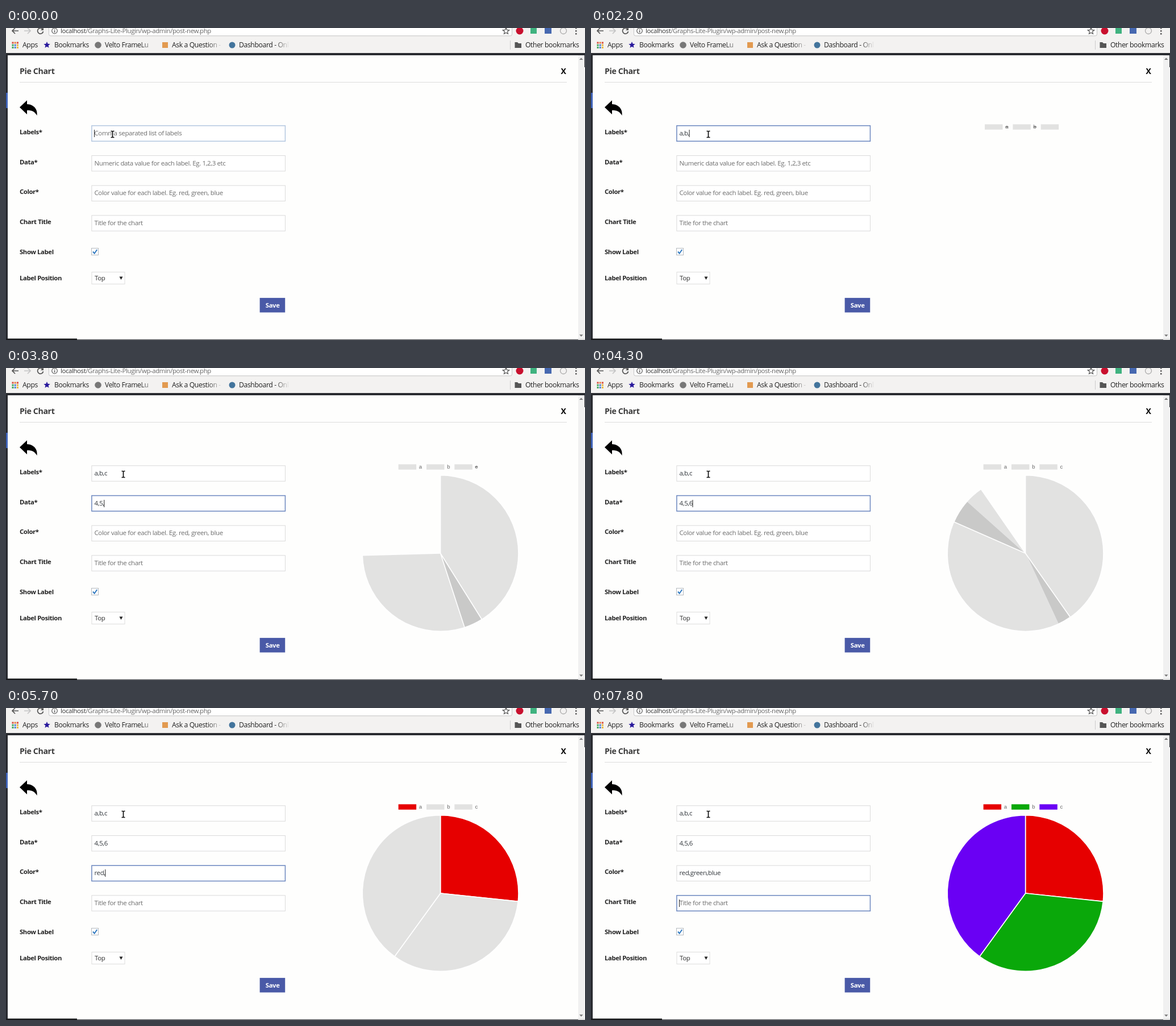
An HTML page with a canvas that plays this animation: 1019x549 px, repeating every 8 s.

```html
<!DOCTYPE html>
<html lang="en">
<head>
<meta charset="utf-8">
<title>Pie Chart form</title>
<style>
html, body { margin: 0; height: 100%; overflow: hidden; background: #fefefd; }
canvas { display: block; }
</style>
</head>
<body>
<canvas width="1019" height="549"></canvas>
<script>
const ctx = document.querySelector('canvas').getContext('2d');
const LOOP = 8000, STEP = 100;
const UI = '"Open Sans", "Noto Sans", sans-serif';
const PAGE = '#fefefd', BAR = '#f3f2f1', GREY = 'rgba(0,0,0,.11)', MUTED = '#636363';
const RED = '#e60000', GREEN = '#0aa80a', BLUE = '#6a00f4';

const fields = [
  ['Labels*', 'Comma separated list of labels'],
  ['Data*', 'Numeric data value for each label. Eg. 1,2,3 etc'],
  ['Color*', 'Color value for each label. Eg. red, green, blue'],
  ['Chart Title', 'Title for the chart'],
];
// time, field, typed text; an empty text means the field takes focus
const keys = [
  [99, 0, ''], [800, 0, 'a'], [1500, 0, 'a,'], [1800, 0, 'a,b'], [2200, 0, 'a,b,'], [2300, 0, 'a,b,c'],
  [2750, 1, ''], [3200, 1, '4'], [3500, 1, '4,'], [3700, 1, '4,5'], [3800, 1, '4,5,'], [4200, 1, '4,5,6'],
  [4550, 2, ''], [5100, 2, 'r'], [5200, 2, 're'], [5300, 2, 'red'], [5500, 2, 'red,'], [5800, 2, 'red,g'],
  [5900, 2, 'red,gr'], [6000, 2, 'red,gre'], [6200, 2, 'red,gree'], [6300, 2, 'red,green'],
  [6500, 2, 'red,green,'], [6900, 2, 'red,green,b'], [7100, 2, 'red,green,bl'],
  [7300, 2, 'red,green,blu'], [7400, 2, 'red,green,blue'], [7700, 3, ''],
];
const legends = [[0, null], [900, 'a'], [1700, 'a,'], [1900, 'a,b'], [2200, 'a,b,'], [2400, 'a,b,c']];
const strikeEnds = [3000, 3782, 4240];
const updates = [[3450, [4]], [3659, [4, 0]], [3782, [4, 5]], [3833, [4, 5, 0]], [4240, [4, 5, 6]], [4820, [4, 5, 6]]];
// time, legend colour, slice colour; half-typed names keep the previous fill
const paints = [
  [[0, GREY, GREY], [4820, MUTED, MUTED], [5300, RED, RED]],
  [[0, GREY, GREY], [5800, MUTED, RED], [6300, GREEN, GREEN]],
  [[0, GREY, GREY], [6900, MUTED, GREEN], [7400, BLUE, BLUE]],
];

const latest = (list, t) => list.filter(e => e[0] <= t).pop() || list[0];

function rect(x, y, w, h, fill) {
  ctx.fillStyle = fill;
  ctx.fillRect(x, y, w, h);
}

function frame(x, y, w, h, color, width = 1) {
  ctx.strokeStyle = color;
  ctx.lineWidth = width;
  ctx.strokeRect(x, y, w, h);
}

function text(s, x, y, color, size = 11.5, weight = 400) {
  ctx.font = `${weight} ${size}px ${UI}`;
  ctx.letterSpacing = '-0.38px';
  ctx.fillStyle = color;
  ctx.fillText(s, x, y);
  return ctx.measureText(s).width;
}

function path(d, fill, stroke, width = 1.5) {
  const p = new Path2D(d);
  if (fill) { ctx.fillStyle = fill; ctx.fill(p); }
  if (stroke) { ctx.strokeStyle = stroke; ctx.lineWidth = width; ctx.stroke(p); }
}

function dot(x, y, r, fill, stroke) {
  ctx.beginPath();
  ctx.arc(x, y, r, 0, 7);
  if (fill) { ctx.fillStyle = fill; ctx.fill(); }
  if (stroke) { ctx.strokeStyle = stroke; ctx.lineWidth = 1.3; ctx.stroke(); }
}

function star(x, y, r, fill, stroke) {
  let d = '';
  for (let i = 0; i < 10; i++) {
    const a = i * Math.PI / 5, q = i % 2 ? r * .45 : r;
    d += (i ? 'L' : 'M') + (x + q * Math.sin(a)) + ' ' + (y - q * Math.cos(a));
  }
  path(d + 'Z', fill, stroke, 1.2);
}

function bookmark(s, x, end) {
  text(s, x, 34, '#222', 12.2);
  if (!end) return;
  const g = ctx.createLinearGradient(end - 26, 0, end, 0);
  g.addColorStop(0, 'rgba(243,242,241,0)');
  g.addColorStop(1, BAR);
  rect(end - 26, 20, 26, 20, g);
  rect(end, 20, 16, 20, BAR);
}

function browser() {
  rect(0, 0, 1019, 44, BAR);
  ctx.beginPath();
  ctx.roundRect(75.5, -10, 815, 23.8, 3);
  ctx.fillStyle = '#fff';
  ctx.fill();
  ctx.strokeStyle = '#c4c4c4';
  ctx.lineWidth = 1;
  ctx.stroke();
  path('M22 5H11M16 0L11 5L16 10', null, '#555', 1.7);
  path('M32 5H43M38 0L43 5L38 10', null, '#c4c4c4', 1.7);
  path('M64.5 2A5 5 0 1 0 65.5 6', null, '#555', 1.7);
  path('M66 -1V4H61Z', '#555');
  dot(85.5, 5, 4.8, null, '#666');
  rect(85, 4, 1.3, 4, '#555');
  rect(85, 1.8, 1.3, 1.3, '#555');
  const w = text('localhost', 96, 9, '#333', 11.4);
  text('/Graphs-Lite-Plugin/wp-admin/post-new.php', 96 + w, 9, '#666', 11.4);
  star(880, 5.5, 6, null, '#555');
  dot(904, 5, 6.5, '#c8102e');
  rect(923, 0, 11, 10, '#3fb27f');
  rect(948, 0, 12, 10, '#4668b0');
  dot(981, 5, 5.5, null, '#aaa');
  for (const y of [0, 5, 10]) rect(1002, y - 1, 2.5, 2.5, '#555');

  ['#d94a3d', '#e8833a', '#d94a3d', '#3aa757', '#4a80d9', '#e8b73a', '#3aa757', '#4a80d9', '#e8b73a']
    .forEach((c, i) => rect(10.5 + i % 3 * 4.2, 24.5 + (i / 3 | 0) * 4.2, 3, 3, c));
  bookmark('Apps', 29);
  star(72, 30, 6, '#2a1a9c');
  bookmark('Bookmarks', 85);
  dot(162, 30, 5.8, '#777');
  bookmark('Velto FrameLu', 174, 263);
  rect(275, 25, 10, 10, '#e29a50');
  bookmark('Ask a Question -', 292, 381);
  dot(398, 30, 5.5, '#43749c');
  bookmark('Dashboard - Onl', 410, 499);
  rect(887, 22, 1, 16, '#ccc');
  path('M895.5 25H900L902 27H907V35H895.5Z', '#555');
  bookmark('Other bookmarks', 914);
}

function form() {
  rect(0, 44, 1019, 505, PAGE);
  rect(0, 44, 1019, 4, '#292b30');
  rect(0, 44, 3, 505, '#292b30');
  rect(0, 114, 3, 27, '#3f63b8');
  rect(0, 547, 1019, 2, '#dadada');
  rect(0, 546.5, 125, 2.5, '#17181a');
  rect(125, 548, 882, 1, '#55575a');
  rect(1007, 48, 11, 499, '#f1f1f1');
  rect(1018, 44, 1, 25, '#292b30');
  path('M1009 56L1012.3 52.5L1015.6 56Z', '#777');
  path('M1009 539.5L1012.3 543L1015.6 539.5Z', '#777');

  text('Pie Chart', 24, 81, '#3a3a3a', 14.2, 700);
  text('X', 976.5, 81, '#000', 14, 700);
  rect(24, 95, 963, 1, '#ddd');
  path('M24 139.5L37 127.3V134C49 134.5 56 143 54.5 154C50.5 147 46 144.7 37 144.7V152Z', '#000');

  text('Show Label', 24, 398, '#222', 11.3, 700);
  rect(150.5, 387.5, 12, 12, '#fff');
  frame(150.5, 387.5, 12, 12, '#b4b9be');
  path('M153 393.5L155.7 396.7L160.2 390', null, '#2f79c0', 2);
  text('Label Position', 24, 444, '#222', 11.3, 700);
  rect(151, 430, 58, 20, '#fff');
  frame(151, 429.5, 58, 21, '#ddd');
  text('Top', 156, 444, '#333');
  path('M199.5 437.5H205.5L202.5 443Z', '#222');
  rect(446.6, 474.9, 44.6, 25.6, '#4a5aa7');
  text('Save', 456.8, 492, '#fff', 11.3, 700);
}

function inputs(t) {
  const key = latest(keys, t), focus = key[1];
  const fading = (t < STEP ? t : t - keys.find(k => k[1] === focus)[0]) < 40 && !key[2];
  fields.forEach(([label, hint], i) => {
    const y = 172 + i * 52.65;
    const box = [150.9, y - .1, 340.5, 27.3];
    text(label, 24, Math.round(y + 15), '#222', 11.3, 700);
    rect(...box, '#fff');
    if (i !== focus) frame(...box, '#dadada');
    else frame(...box, fading ? '#b3c7e0' : '#6b87bf', 1.5);
    const typed = latest([[0, i, ''], ...keys.filter(k => k[1] === i)], t)[2];
    const base = Math.round(y + 17);
    const w = text(typed || hint, 155.5, base, typed ? '#32373c' : '#6e6e6e');
    const lit = Math.max(0, t - key[0]) % 1000 < 500;
    if (i === focus && lit) rect(155 + (typed ? w : 0), base - 10, 1, 13, '#222');
  });
}

function legend(t) {
  const names = latest(legends, t)[1];
  if (names === null) return;
  const k = .787, items = names.split(',');
  ctx.font = '9.5px "Liberation Sans", Arial, sans-serif';
  ctx.letterSpacing = '0px';
  const widths = items.map(s => ctx.measureText(s).width);
  let x = 764.4 - widths.reduce((sum, w) => sum + w + 56 * k, 0) / 2;
  items.forEach((s, i) => {
    rect(x, 169.4, 40 * k, 9.4, latest(paints[i], t)[1]);
    ctx.fillStyle = '#666';
    ctx.fillText(s, x + 46 * k, 177.3);
    if (t < strikeEnds[i]) rect(x + 46 * k, 173.4, widths[i], 1.4, '#666');
    x += widths[i] + 56 * k;
  });
}

// Each update eases every slice edge from where it stands to its new place.
function slices(t) {
  const arcs = [[0, 0], [0, 0], [0, 0]];
  updates.forEach(([start, data], n) => {
    if (t < start) return;
    const end = Math.min(t, n + 1 < updates.length ? updates[n + 1][0] : LOOP);
    const rest = (1 - Math.min(1, (end - start) / 1000)) ** 4;
    const total = data.reduce((a, b) => a + b);
    let edge = 0;
    data.forEach((v, i) => {
      const to = [edge, edge += v / total * 2 * Math.PI];
      arcs[i] = arcs[i].map((from, j) => to[j] + (from - to[j]) * rest);
    });
  });
  return arcs;
}

function pie(t) {
  if (t < updates[0][0]) return;
  ctx.lineJoin = 'bevel';
  slices(t).forEach(([from, to], i) => {
    if (to === 0) return;
    ctx.beginPath();
    ctx.arc(764.6, 326, 137.4, from - Math.PI / 2, to - Math.PI / 2);
    ctx.lineTo(764.6, 326);
    ctx.closePath();
    ctx.fillStyle = latest(paints[i], t)[2];
    ctx.fill();
    ctx.strokeStyle = '#fff';
    ctx.lineWidth = 1.6;
    ctx.stroke();
  });
  ctx.lineJoin = 'miter';
}

function pointer(t) {
  const x = t < 100 ? 187.5 : t < 200 ? 197 : 206.5;
  const d = `M${x - 3} 181.5H${x - 1}L${x} 182.5L${x + 1} 181.5H${x + 3}M${x} 182V192M${x - 3} 192.5H${x - 1}L${x} 191.5L${x + 1} 192.5H${x + 3}`;
  path(d, null, '#fff', 3.5);
  path(d, null, '#111', 1.7);
}

function draw(t) {
  browser();
  form();
  inputs(t);
  legend(t);
  pie(t);
  pointer(t);
}

let origin;
function tick(now) {
  origin ??= now;
  draw(Math.floor((now - origin) % LOOP / STEP) * STEP);
  requestAnimationFrame(tick);
}
requestAnimationFrame(tick);
</script>
</body>
</html>
```
